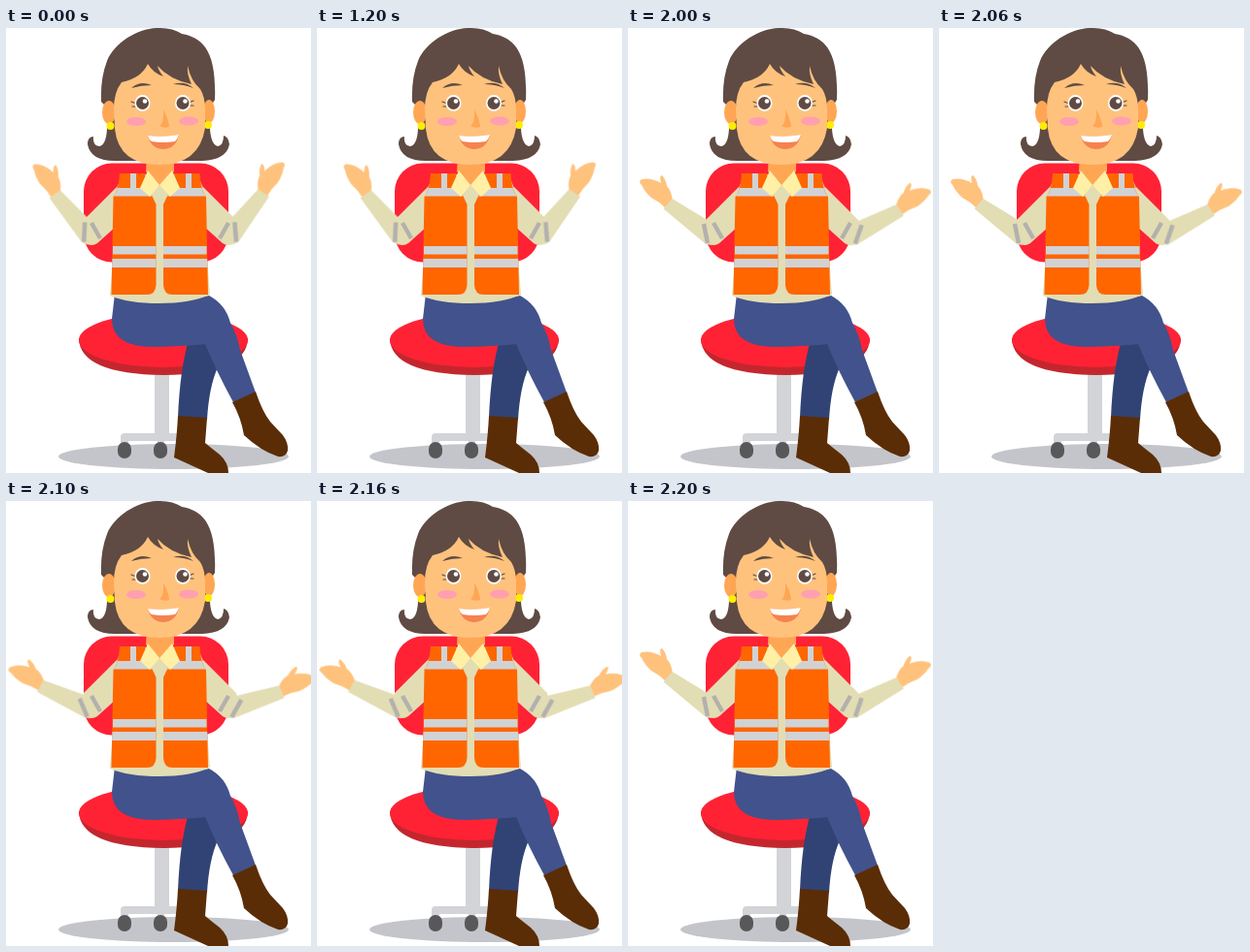
Animation, 314 px wide and 459 px high, one loop 2300 ms. Source, as an HTML page:

```html
<!DOCTYPE html>
<html lang="en">
<head>
<meta charset="utf-8">
<title>Shrugging engineer</title>
<style>
  html, body { margin: 0; width: 100%; height: 100%; overflow: hidden; background: #fff; }
  svg { display: block; width: 100vw; height: 100vh; }
  .hair { fill: #5f4b43; }
  .skin { fill: #ffc27d; }
  .shade { fill: #ffa654; }
  .shirt { fill: #e3ddb4; }
  .vest { fill: #ff6600; }
  .tape { fill: #d1d2d4; }
  .cuff { stroke: #b3b1ae; stroke-width: 4.5; fill: none; }
  .red { fill: #ff2235; }
  .steel { fill: #d3d4d7; }
  .wheel { fill: #58585a; }
  .boot { fill: #5a2d06; }
  .line { fill: none; stroke: #5f4b43; stroke-linecap: round; }
  .forearm { transform-origin: 86px 214px; }
</style>
</head>
<body>
<svg viewBox="0 0 314 459" preserveAspectRatio="none">
  <defs>
    <path id="upper" class="shirt" d="M114 164L80 198Q76 212 83 222Q88 226 94 222L114 204Z"/>
    <g id="lower">
      <path class="skin" d="M46 179Q45 168 40 163Q39 156 35 152Q32 152 34 160Q24 154 14 156Q10 158 14 162Q18 170 24 175Q32 179 39 186Z"/>
      <path class="shirt" d="M45.500 176L93 205Q98 213 92 221Q86 226 79 222L36.500 186.500Z"/>
      <path class="cuff" d="M78 202L82 222"/>
    </g>
    <path id="band" class="cuff" d="M88 201L97 217"/>
  </defs>

  <!-- Chair -->
  <ellipse cx="172.500" cy="442" rx="118.500" ry="13" fill="#c4c5ca"/>
  <path class="steel" d="M153 350H168V418H190V426H163V432H156V426H126V432H118V422Q118 418 122 418H153Z"/>
  <rect class="wheel" x="115" y="427" width="14" height="17" rx="7"/>
  <rect class="wheel" x="152" y="427" width="14" height="17" rx="7"/>
  <rect class="red" x="80" y="139.500" width="149" height="102" rx="29"/>
  <path d="M75 320Q76 357 162 358Q248 357 249 320Z" fill="#c4262e"/>
  <ellipse class="red" cx="162" cy="322" rx="87" ry="28"/>

  <!-- Legs -->
  <path d="M188 322Q179 352 177 402L207 404Q209 370 218 350L209 322Z" fill="#304374"/>
  <path class="boot" d="M177 400L207 402L205 428Q211 433 220 440Q229 448 229 459H208L173 443Q176 420 177 400Z"/>
  <path d="M112 274Q160 288 209 276Q226 285 231 304Q238 316 241 332L257 376L234 386Q217 355 205 326Q190 328 152 329Q109 329 109 300Z" fill="#42528c"/>
  <path class="boot" d="M233 386L257 375Q264 396 272 406L285 420Q291 428 290 436Q288 443 280 442Q262 436 245 420Q242 402 233 386Z"/>

  <!-- Arms -->
  <g>
    <use href="#upper"/>
    <use href="#lower" class="forearm" data-angles="14 0 -11.5"/>
    <use href="#band"/>
  </g>
  <g transform="translate(317 0) scale(-1 1)">
    <use href="#upper"/>
    <use href="#lower" class="forearm" data-angles="16 -8 -18"/>
    <use href="#band"/>
  </g>

  <!-- Torso -->
  <path class="shirt" d="M120 151H197L206 172V225L210 275Q190 284 158 284Q126 284 107 276L111 225V172Z"/>
  <g id="panel">
    <path class="vest" d="M117 150H143L147 166L154.500 182V265Q154 275 145 275H108.500L110.500 174Q116 168 117 150Z"/>
    <path class="tape" d="M115 165H147L150.500 173.500H110.500Q114 170 115 165Z"/>
    <path class="tape" d="M110 225H154.500V233.500H110ZM109.500 238H154.500V247H109Z"/>
  </g>
  <use href="#panel" transform="translate(316.500 0) scale(-1 1)"/>
  <path class="tape" d="M128 150H134V166H128ZM185 150H191V166H185Z"/>

  <!-- Head -->
  <path class="hair" d="M159 0C138 -1 112 14 104 34Q97 52 98 76L104 82V104Q103 121 96 122Q89 121 90 112Q84 112 84 120Q87 137 112 137H202Q227 136 230 120Q229 112 224 111Q224 121 218 122Q211 120 210 104V82L215 74C217 24 203 10 181 6Q172 0 159 0Z"/>
  <path class="shade" d="M145 130H173V148L158 163L144 148Z"/>
  <path d="M146 147L158 162L148 174L138 165ZM171 147L158 162L169 174L179 165Z" fill="#fff0a6"/>
  <ellipse class="shade" cx="106" cy="87" rx="7" ry="12"/>
  <ellipse class="shade" cx="209" cy="86" rx="6" ry="12"/>
  <circle cx="107.500" cy="101" r="4" fill="#ffed00"/>
  <circle cx="208" cy="100" r="4" fill="#ffed00"/>
  <path class="skin" d="M111 84Q111 66 119 56Q139 52 146 37Q151 46 162 50Q157 44 156 39Q168 53 191 58Q186 48 187 39Q190 54 200 63Q205 71 205 84V103Q199 141 158 141Q116 141 112 104Z"/>
  <g fill="#ff9fb0">
    <ellipse cx="134" cy="96.500" rx="10" ry="4.500"/>
    <ellipse cx="188" cy="96" rx="10" ry="4.500"/>
  </g>
  <path class="hair" d="M129 62Q138 54 150 59Q139 59 129 62ZM172 58Q184 54 193 62Q183 58 172 58Z"/>
  <path class="line" stroke-width="1.200" d="M134 78L129 76M134 81L130 81M188 77L193 75M188 80L193 80"/>
  <g id="eye">
    <ellipse cx="140.500" cy="77.500" rx="8" ry="8.500" fill="#fff"/>
    <circle class="hair" cx="140.500" cy="77.500" r="6.500"/>
    <circle cx="143" cy="75.500" r="2.300" fill="#fff"/>
  </g>
  <use href="#eye" x="41.500"/>
  <path class="shade" d="M162 84Q168 96 168 102Q163 104 158 101Q163 98 162 84Z"/>
  <path d="M146 111Q162 113 178 110Q175 125 161 125Q149 124 146 111Z" fill="#f5824f"/>
  <path d="M146 111Q162 113 178 110Q177 114 174 117Q161 119 150 117Q147 115 146 111Z" fill="#fff"/>
</svg>
<script>
  const LOOP = 2300;

  // Each arm holds its raised pose, then flicks out, further out and back.
  for (const arm of document.querySelectorAll('.forearm')) {
    const [raised, out, wide] = arm.dataset.angles.split(' ');
    const steps = [[0, raised], [2000, out], [2100, wide], [2200, out], [LOOP, out]];
    const frames = steps.map(([time, angle]) => ({
      offset: time / LOOP,
      transform: `rotate(${angle}deg)`,
      easing: 'step-end'
    }));
    arm.animate(frames, { duration: LOOP, iterations: Infinity });
  }
</script>
</body>
</html>
```
